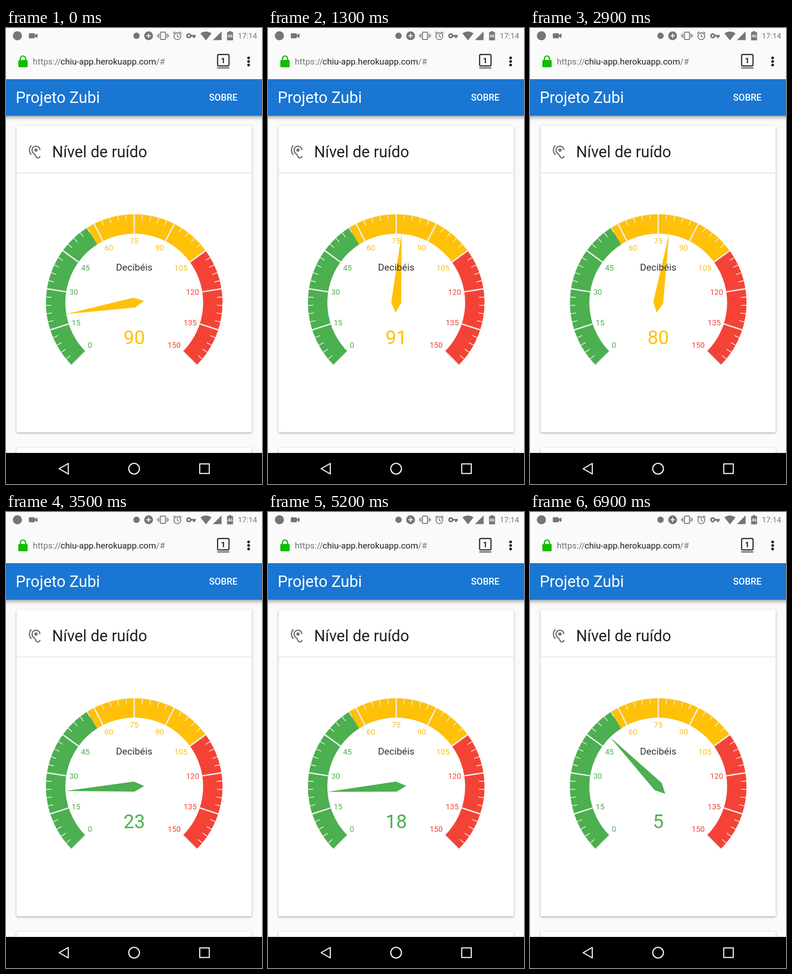
An HTML page with a canvas for the animation above (7 s loop, 561 by 998 pixels).

```html
<!DOCTYPE html>
<html lang="pt">
<head>
<meta charset="utf-8">
<title>Nível de ruído</title>
<style>
html, body { margin: 0; width: 100%; height: 100%; overflow: hidden; background: #fafafa; }
canvas { display: block; }
</style>
</head>
<body>
<canvas id="stage" width="561" height="998"></canvas>
<script>
const ctx = document.getElementById('stage').getContext('2d');
const LOOP = 7000, STEP = 100;
const GREEN = '#4caf50', AMBER = '#ffc107', RED = '#f44336', GREY = '#757575', TICK = '#eeeeee';
const CX = 281, CY = 601, OUTER = 193.5, INNER = 151, MAX = 150;

// [time, needle value]
const needleKeys = [
  [0, 19.7], [100, 61.8], [200, 61.8], [300, 77], [500, 57], [600, 57], [1000, 99],
  [1200, 76], [1300, 77.5], [1400, 91], [2000, 19.7], [2100, 19.7], [2200, 45.7],
  [2400, 54], [2900, 80], [3500, 23], [3800, 23], [4500, 49], [4600, 49.2], [4800, 70],
  [5000, 24], [5100, 24], [5400, 18.5], [5800, 52.5], [6000, 56], [6300, 31], [6700, 64],
  [6900, 50.4]
];
// [time, reading]
const readings = [
  [0, 90], [300, 79], [400, 57], [700, 99], [1100, 74], [1300, 91], [1500, 20], [2200, 54],
  [2500, 80], [3000, 23], [3900, 49], [4700, 70], [4900, 24], [5200, 18], [5600, 76],
  [5900, 31], [6400, 64], [6800, 5]
];

const angleOf = v => (135 + v * 1.8) * Math.PI / 180;
const colorOf = v => v < 57 ? GREEN : v <= 105 ? AMBER : RED;
const lastBefore = (keys, t) => keys.findLastIndex(k => k[0] <= t);

function needleAt(t) {
  const i = lastBefore(needleKeys, t);
  const [t0, v0] = needleKeys[i];
  const [t1, v1] = needleKeys[i + 1] || [LOOP, v0];
  const p = (t - t0) / (t1 - t0);
  return v0 + (v1 - v0) * p * p * (3 - 2 * p);
}

function text(str, x, y, size, color, align = 'left', weight = 400) {
  ctx.font = `${weight} ${size}px Roboto, sans-serif`;
  ctx.textAlign = align;
  ctx.fillStyle = color;
  ctx.fillText(str, x, y);
  return x + ctx.measureText(str).width;
}
function rect(x, y, w, h, color) {
  ctx.fillStyle = color;
  ctx.fillRect(x, y, w, h);
}
function rounded(x, y, w, h, r, color, line) {
  ctx.beginPath();
  ctx.roundRect(x, y, w, h, r);
  paint(color, line);
}
function circle(x, y, r, color, line) {
  ctx.beginPath();
  ctx.arc(x, y, r, 0, 2 * Math.PI);
  paint(color, line);
}
function paint(color, line) {
  if (line) {
    ctx.strokeStyle = color;
    ctx.lineWidth = line;
    ctx.stroke();
  } else {
    ctx.fillStyle = color;
    ctx.fill();
  }
}
function path(d, color, line) {
  const shape = new Path2D(d);
  if (line) {
    ctx.strokeStyle = color;
    ctx.lineWidth = line;
    ctx.stroke(shape);
  } else {
    ctx.fillStyle = color;
    ctx.fill(shape);
  }
}
function withShadow(blur, dy, alpha, draw) {
  ctx.save();
  ctx.shadowColor = `rgba(0,0,0,${alpha})`;
  ctx.shadowBlur = blur;
  ctx.shadowOffsetY = dy;
  draw();
  ctx.restore();
}

function drawStatusBar() {
  circle(25, 17, 10, GREY);
  rounded(50, 11.5, 13, 11, 1.5, GREY);
  path('M62 16L69 12V22L62 18Z', GREY);
  circle(286, 17, 7, GREY);
  circle(312.5, 17, 9.7, GREY);
  path('M307.5 17H317.5M312.5 12V22', '#fafafa', 2.2);
  rounded(338.5, 9, 11, 16, 1, GREY, 2);
  path('M335 12V22M332 14.5V19.5M353 12V22M356 14.5V19.5', GREY, 1.8);
  circle(375.5, 18, 7.5, GREY, 1.9);
  path('M375.5 13.5V18.5L379 20.5M366.5 12L371 8.2M384.5 12L380 8.2', GREY, 1.8);
  circle(400.5, 17, 4, GREY, 3.4);
  path('M404 15.2H416V19H414V22H410V19H404Z', GREY);
  path('M426 11.8Q438 3.5 450.5 11.8L438.2 27Z', GREY);
  path('M453.5 26.5H472.5V7.5Z', GREY);
  path('M484.5 9H488V7H494V9H497.5V27H484.5Z', GREY);
  text('46', 491, 21, 9, '#fafafa', 'center', 700);
  text('17:14', 508, 23, 17, GREY);
}

function drawAddressBar() {
  rounded(27, 70, 20.5, 16, 2.5, '#12bb00');
  path('M31.5 71V67A5.7 5.7 0 0 1 43 67V71', '#12bb00', 2.7);
  let x = text('https://', 58.8, 80, 19, GREY);
  x = text('chiu-app.herokuapp.com', x - .8, 80, 19, '#212121');
  text('/#', x, 80, 19, GREY);
  rounded(463.7, 58, 25, 25, 2.5, '#222', 2.4);
  rect(463, 86.5, 26.5, 1.8, '#222');
  text('1', 476, 77, 17, '#222', 'center', 700);
  for (const y of [65.5, 73.2, 81]) circle(531.7, y, 3, '#222');
}

function drawEar() {
  ctx.save();
  ctx.translate(45.7, 254.3);
  ctx.scale(1.43, 1.43);
  path('M20 9A6 6 0 0 0 8 9C8 11 9.2 13.2 11 14.6C14 16.8 13.1 18 14.9 20.2C17 22 20 20.6 20 18', GREY, 2);
  path('M6.93 1.93A10 10 0 0 0 6.93 16.07', GREY, 2);
  circle(14, 9, 2.5, GREY);
  ctx.restore();
}

function drawPage() {
  rect(0, 0, 561, 998, '#fafafa');
  withShadow(9, 3, .42, () => rect(-10, 112, 581, 80, '#1976d2'));
  rect(0, 0, 561, 112, '#fafafa');
  drawStatusBar();
  drawAddressBar();
  text('Projeto Zubi', 21.2, 164, 34.3, '#fff');
  text('SOBRE', 445, 159, 20, '#fff', 'left', 500);
  for (const [y, h] of [[214, 671], [919, 60]]) {
    withShadow(4, 1.5, .35, () => rounded(23, y, 515.5, h, 3, '#fff'));
  }
  rect(23, 316.5, 515.5, 1.5, '#e0e0e0');
  drawEar();
  text('Nível de ruído', 101, 283, 34.3, '#212121');

  rect(0, 930, 561, 68, '#000');
  ctx.lineJoin = 'round';
  path('M116.5 964.5L136.5 953V976Z', '#eee', 2.5);
  circle(280.7, 964.5, 11.7, '#eee', 2.6);
  path('M424.5 954H445.5V975H424.5Z', '#eee', 2.5);
  ctx.lineJoin = 'miter';
}

function drawTick(v, from, width) {
  const c = Math.cos(angleOf(v)), s = Math.sin(angleOf(v));
  ctx.beginPath();
  ctx.moveTo(CX + c * from, CY + s * from);
  ctx.lineTo(CX + c * OUTER, CY + s * OUTER);
  paint(TICK, width);
}

function drawDial() {
  for (const [from, to] of [[0, 57], [57, 105], [105, MAX]]) {
    ctx.beginPath();
    ctx.arc(CX, CY, OUTER, angleOf(from), angleOf(to));
    ctx.arc(CX, CY, INNER, angleOf(to), angleOf(from), true);
    paint(colorOf(from === 105 ? MAX : from));
  }
  for (let v = 0; v <= MAX; v += 3) {
    if (v % 15) drawTick(v, OUTER - 12, 1.6);
    else drawTick(v, INNER, 3);
  }
  for (let v = 0; v <= MAX; v += 15) {
    const c = Math.cos(angleOf(v)), s = Math.sin(angleOf(v));
    const shift = Math.abs(s) > .5 ? -8.5 * Math.sign(s) : 0;
    const align = v < 75 ? 'left' : v > 75 ? 'right' : 'center';
    text(v, CX + c * 144, CY + s * 144 + shift + 6, 17, colorOf(v), align);
  }
}

function drawNeedle(value, color) {
  ctx.save();
  ctx.translate(CX, CY);
  ctx.rotate(angleOf(value));
  path('M151 0L0 11L-22 0L0 -11Z', color);
  ctx.restore();
}

function draw(t) {
  const reading = readings[lastBefore(readings, t)][1];
  const color = colorOf(reading);
  drawPage();
  drawDial();
  drawNeedle(needleAt(t), color);
  text('Decibéis', CX, 530.5, 21, '#333', 'center');
  text(reading, CX, 691.5, 42, color, 'center');
}

const start = performance.now();
function frame() {
  const t = (performance.now() - start) % LOOP;
  draw(Math.floor(t / STEP) * STEP);
  requestAnimationFrame(frame);
}
frame();
</script>
</body>
</html>
```
